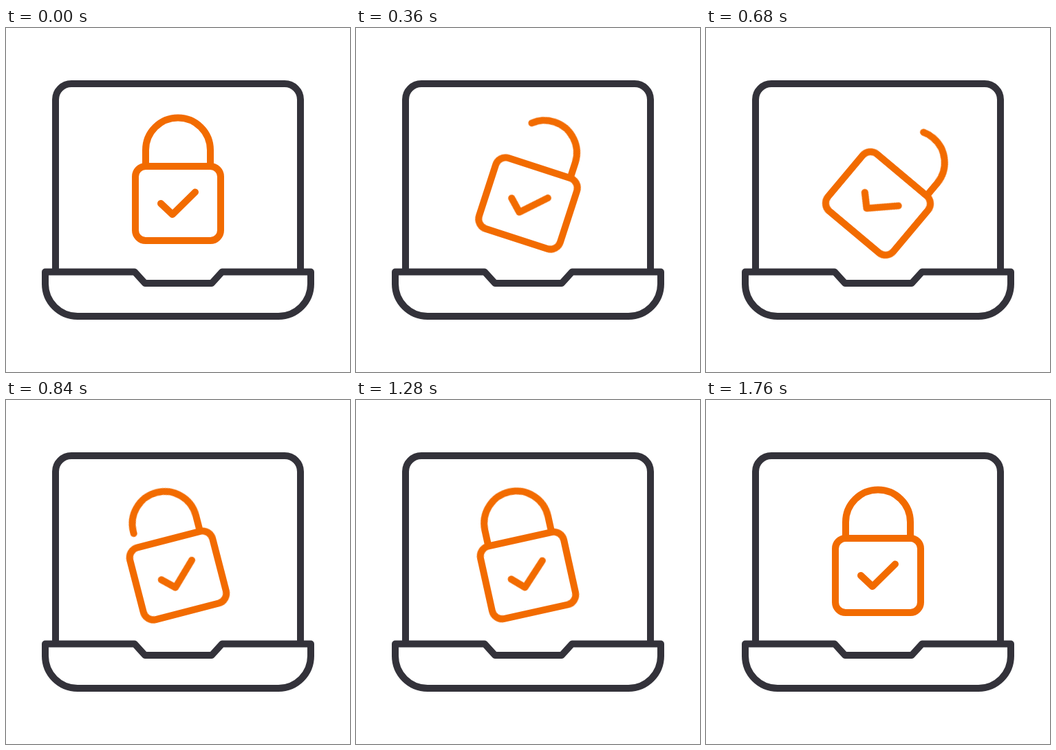
Animation of 500 by 500 pixels, one loop 2000 ms. Source, as an HTML page:

```html
<!DOCTYPE html>
<html lang="en">
<head>
<meta charset="utf-8">
<title>Laptop lock</title>
<style>
  html, body { margin: 0; width: 100%; height: 100%; overflow: hidden; background: #fff; }
  svg { display: block; width: 100vw; height: 100vh; }
  path, rect { fill: none; stroke-width: 10; stroke-linecap: round; stroke-linejoin: round; }
  .laptop { stroke: #33323a; }
  .accent { stroke: #f26b00; }

  .lock, .shackle, .rays path {
    animation: 2s cubic-bezier(.33, 0, .67, 1) infinite;
  }
  .lock { transform-origin: 250px 255px; animation-name: swing; }
  .shackle { stroke-dasharray: 194; animation-name: unlatch; }
  .rays path { stroke-dasharray: 1 2; animation-name: burst; animation-timing-function: linear; }

  @keyframes swing {
    0%, 4% { transform: rotate(0deg); }
    34% { transform: rotate(40deg); }
    42% { transform: rotate(-14.5deg); animation-timing-function: cubic-bezier(.9, 0, .75, 1); }
    88%, 100% { transform: rotate(0deg); }
  }
  @keyframes unlatch {
    0%, 4% { stroke-dashoffset: 0; }
    24%, 34% { stroke-dashoffset: -81px; }
    46%, 100% { stroke-dashoffset: 0; }
  }
  @keyframes burst {
    0%, 42% { stroke-dashoffset: 1px; opacity: 0; }
    42.01% { opacity: 1; }
    42.5% { stroke-dashoffset: 1px; }
    50% { stroke-dashoffset: 0; }
    57.99% { opacity: 1; }
    58%, 100% { stroke-dashoffset: -1px; opacity: 0; }
  }
</style>
</head>
<body>
<svg viewBox="0 0 500 500">
  <g class="laptop">
    <path d="M72 354V104a23 23 0 0 1 23-23H405a23 23 0 0 1 23 23V354"/>
    <path d="M57 354.500H187L202 371H299L314 354.500H443V372a47 47 0 0 1-47 47H104a47 47 0 0 1-47-47Z"/>
  </g>
  <g class="accent rays">
    <path pathLength="1" d="M135 167L111 151"/>
    <path pathLength="1" d="M135 205L104.500 206"/>
    <path pathLength="1" d="M138 242L108 252"/>
  </g>
  <g class="accent lock">
    <path class="shackle" d="M203 201V177.500a47 47 0 0 1 94 0V201"/>
    <rect x="188" y="201" width="124" height="108" rx="15"/>
    <path d="M225 255L242 271L275 238.500"/>
  </g>
</svg>
<script>
  // Run the keyframes on a 25 fps clock.
  const STEP = 40, LOOP = 2000;
  const anims = document.getAnimations();
  anims.forEach(a => a.pause());
  const start = performance.now();

  function tick() {
    const t = (performance.now() - start) % LOOP;
    const time = Math.floor(t / STEP) * STEP;
    anims.forEach(a => { a.currentTime = time; });
    requestAnimationFrame(tick);
  }
  tick();
</script>
</body>
</html>
```
